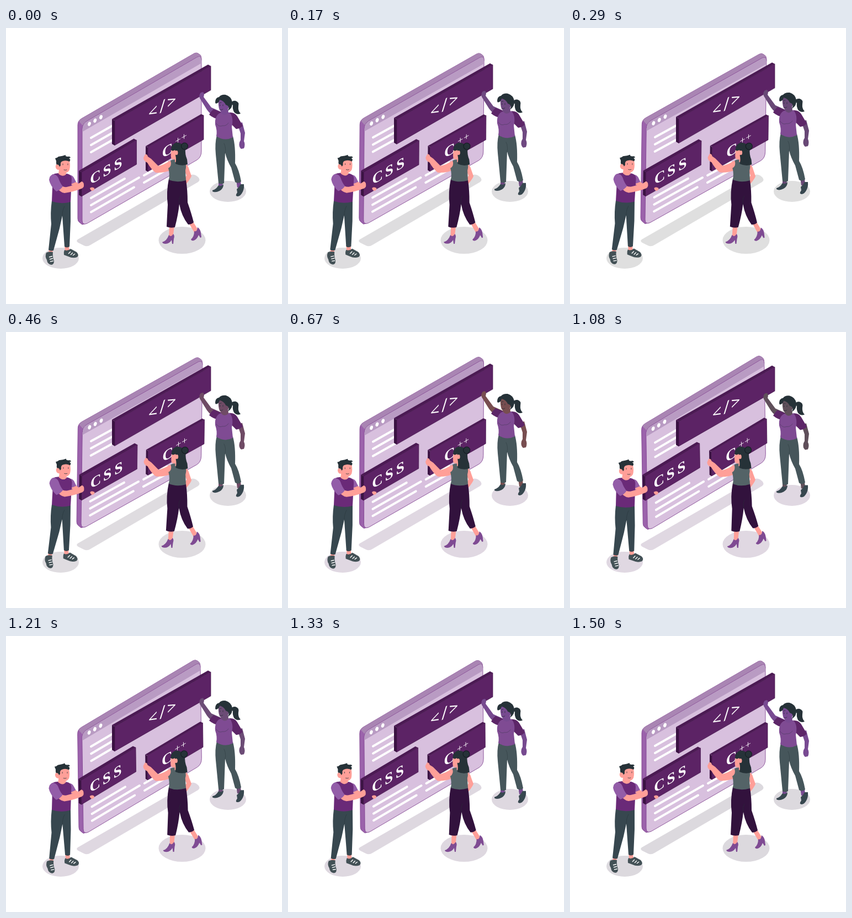
These frames come from a looping animation (500x500 px, 1540 ms). An HTML page:

```html
<!DOCTYPE html>
<html lang="en">
<head>
<meta charset="utf-8">
<title>Building a page</title>
<style>
  html, body { margin: 0; height: 100%; overflow: hidden; background: #fff; }
  svg { display: block; width: 100vw; height: 100vh; --skin: #784a92; --shade: #dcd9de; }
  .shade { fill: var(--shade); }
  .brown { fill: var(--skin); }
  .pink { fill: #ff9f98; }
  .hair { fill: #263238; }
  .slate { fill: #37474f; }
  .shoe { fill: #435156; }
  .grey { fill: #546367; }
  .plum { fill: #6a2a78; }
  .lilac { fill: #935da8; }
  .violet { fill: #7f4b93; }
  .night { fill: #32123d; }
  .face { fill: #5c2365; stroke: #431549; stroke-width: .7; }
  .side { fill: #3a1242; }
  .edge { fill: #4b1a53; }
  .line { fill: none; stroke: #fff; stroke-width: 4; stroke-linecap: round; }
  .crease { fill: none; stroke: #263238; stroke-width: .8; stroke-linecap: round; }
  .lace { fill: none; stroke: #fff; stroke-width: 1.4; }
  text { fill: #fff; text-anchor: middle; }
  .serif { font: bold 27px "Liberation Serif", serif; }
  .plus { font: 18px "Liberation Serif", serif; }
  .code { font: 29px "Noto Sans", sans-serif; }
</style>
</head>
<body>
<svg viewBox="0 0 500 500">
  <g class="shade">
    <path d="M130 383L332 267Q339 264 344 267L348 270Q353 275 348 279L153 393Q147 397 141 394L131 389Q126 386 130 383Z"/>
    <ellipse cx="99" cy="417" rx="33" ry="19"/>
    <ellipse cx="319" cy="384.500" rx="42.500" ry="24.500"/>
    <ellipse cx="402" cy="296" rx="33" ry="19"/>
  </g>

  <g id="page" stroke="#7a3a8a" stroke-width=".8">
    <path fill="#9b62ab" d="M130 176Q130 168 137 164L341 46Q345 44 348 46L352 49Q354 51 354 58L146 354L138 356L133 352Q130 350 130 345Z"/>
    <path fill="#a985b3" stroke="none" d="M132 169Q134 166 137 164L341 46Q345 44 348 46L352 49Q354 51 354 56L146 171L139 177Z"/>
    <path fill="#d8c0de" d="M138 184Q138 174 146 169L346 53Q354 49 354 58V223Q354 234 346 239L147 354Q138 358 138 348Z"/>
    <path fill="#b99bc3" stroke="none" d="M138.400 188V184Q138.400 174 146 169.500L346 53.500Q353.600 49.500 353.600 58V64Z"/>
    <g fill="#fff" stroke="none">
      <ellipse cx="151" cy="173.700" rx="2.700" ry="4" transform="rotate(20 151 173.700)"/>
      <ellipse cx="161.300" cy="167.700" rx="2.700" ry="4" transform="rotate(20 161.300 167.700)"/>
      <ellipse cx="172" cy="161.500" rx="2.700" ry="4" transform="rotate(20 172 161.500)"/>
    </g>
    <path class="line" d="M154 199l44-25M154 212l44-25M154 225l44-25M154 308l61-35M154 321l87-50M154 333.500l78-45M250 267l42-24M250 280l42-24"/>
  </g>

  <g id="lifter">
    <path class="edge" d="M192 165L366 66.300L371 69L197 168Z"/>
    <path class="side" d="M192 165l5 3v45l-5-3z"/>
    <path class="face" d="M197 168L371 69V112.500L197 212.500Z"/>
    <text class="code" transform="matrix(1 -.577 0 1 266 162)" x="0 17.500 34">&lt;/&gt;</text>

    <path class="brown" d="M385 278h8l-1 12h-7zM417 275h8l1 14h-7z"/>
    <path class="slate" d="M374 294Q380 293 385 285Q390 288 394 283Q394 291 387 295Q379 299 374 296ZM418 292Q422 289 425 283H431Q432 293 427 300Q422 307 417 304Q416 302 419 298Z"/>
    <path fill="#46565b" d="M382 194Q378 209 380 229L385 281Q390 284 395 281L397 226Q400 239 408 253L415 279Q421 283 426 278Q422 256 415 245Q416 213 411 196Z"/>
    <path class="crease" opacity=".5" d="M397 227Q399 216 395 209"/>
    <path class="brown" d="M386 161Q371 159 364 148L351 127Q349 121 353 117L357 116Q360 119 358 125L372 144L390 152Z"/>
    <path class="brown" d="M419 173L428 171L433 190L431 205Q434 211 431 218L426 219Q421 215 423 207L425 203L425 191Z"/>
    <path fill="#5d2668" d="M391 153L376 147Q371 151 368 157Q376 164 386 165ZM404 153Q414 152 419 160L429 177Q425 182 417 183L406 172Z"/>
    <path class="violet" d="M382 159Q385 154 391 153L405 153Q413 162 409 179L411 198Q396 206 381 196Q383 186 379 175Q378 165 382 159Z"/>
    <path class="crease" opacity=".45" d="M381 173Q386 180 392 177Q399 178 403 172"/>
    <path class="brown" d="M390 143L402 142L403 154Q396 161 389 153Z"/>
    <path class="hair" d="M408 136Q410 131 416 132Q423 134 421 142Q420 150 425 155Q418 158 413 152Q410 146 411 140Z"/>
    <path class="brown" d="M385 128Q384 142 387 149Q390 153 396 151Q404 147 406 138L403 127Z"/>
    <path class="hair" d="M379 135Q379 126 386 125Q390 120 398 121Q408 124 410 134Q411 145 402 150Q405 144 402 141L398 139Q395 132 387 130Q386 136 380 137Z"/>
    <path class="crease" d="M387 136l3-1M388 139v2M393 139v2M389 148q3 1 4-1"/>
  </g>

  <g id="styler">
    <path class="edge" d="M132 258.500L231.500 200.500L236.500 203L137 261.500Z"/>
    <path class="side" d="M132 258.500l5 3v44l-5-3z"/>
    <path class="face" d="M137 261L236.500 203V247L137 305Z"/>
    <text class="serif" transform="matrix(1 -.577 0 1 162 278.500)" x="0 21 41">CSS</text>

    <path class="pink" d="M152 290Q156 287 160 290Q161 293 157 295Q153 295 152 290Z"/>
    <path class="pink" d="M78 400h7l-1 10h-7zM106 394h8l1 10h-8z"/>
    <path class="shoe" d="M73 407Q79 404 85 406Q84 414 87 422Q87 429 82 429Q75 428 74 420Q70 414 73 407ZM106 402Q111 405 117 400L128 406Q133 411 129 415Q121 418 113 414L105 411Q104 406 106 402Z"/>
    <path class="lace" d="M78 415l6-1.500M79 419l6-1.500M80 423l6-1M113 409l4-4M117 411l4-4M121 412l4-3"/>
    <path class="slate" d="M83 313Q80 335 82 355L77 402Q81 405 86 403L97 363L102 340L106 396Q110 399 115 396L117 350V313Z"/>
    <path class="crease" opacity=".6" d="M102 340Q102 330 106 323"/>
    <path class="lilac" d="M114 266Q121 266 124 273L128 281L118 288Z"/>
    <path class="pink" d="M117 283L127 279L134 284L130 291Z"/>
    <path class="plum" d="M83 266Q89 263 95 263L111 264Q119 266 119 273L117 315Q100 320 83 314L84 290Z"/>
    <path class="pink" d="M96 257L109 258L109 265Q103 271 95 264Z"/>
    <path class="pink" d="M90 286L97 283Q103 289 110 288L130 283L137 278Q141 279 141 284Q142 290 134 292Q121 297 106 299Q97 298 90 286Z"/>
    <path class="lilac" d="M85 265Q79 267 78 275Q80 286 91 296Q98 294 103 287Q98 281 95 272Q92 265 85 265Z"/>
    <path class="pink" d="M94 240Q103 236 115 240Q117 250 115 257Q112 263 104 263Q97 261 95 256Z"/>
    <path class="hair" d="M95 254Q90 248 91 241L89 236Q92 236 95 233Q103 232 108 230Q107 233 112 233Q116 232 117 235L114 236Q118 238 115 242Q109 239 103 241Q98 242 99 249Z"/>
    <ellipse class="pink" cx="93.500" cy="252" rx="3.500" ry="5" transform="rotate(-20 93.500 252)"/>
    <path class="crease" d="M103 246v2M112 246v2M105 257q3 1 5 0"/>
  </g>

  <g id="coder">
    <path class="edge" d="M253 214L353.500 156L358 158L257 216Z"/>
    <path class="side" d="M253 214l4 2.500v44l-4-2.500z"/>
    <path class="face" d="M257 216L358 158V202L257 260Z"/>
    <text class="serif" transform="matrix(1 -.577 0 1 292.500 230.500)">C</text>
    <text class="plus" transform="matrix(1 -.577 0 1 311.500 209)" x="0 11">++</text>

    <path class="pink" d="M296 358h9l-2 17-8 5zM331 353l8-2 8 13-5 8z"/>
    <path class="violet" d="M283 388Q291 386 295 375Q299 380 303 373Q306 376 304 382L303 391L301 391L300 384Q296 391 289 391Q284 391 283 388ZM335 383Q341 378 341 368Q346 370 347 361Q352 364 353 371L354 379L352 380L349 375Q346 383 340 385Q336 386 335 383Z"/>
    <path class="pink" d="M324 246Q330 248 332 257L336 268Q335 272 327 282L322 276L327 267L322 256Z"/>
    <path class="night" d="M295 273Q290 298 293 320L291 360Q298 363 306 361Q312 338 314 319Q318 341 330 356Q336 356 340 352Q336 336 329 316Q329 294 326 275Z"/>
    <path class="crease" opacity=".6" d="M314 319Q312 311 316 304"/>
    <path class="pink" d="M304 241Q308 249 300 257Q287 263 271 262Q263 256 256 244Q249 241 249 235L252 229Q256 228 257 233L263 237L276 250Q286 248 296 241Z"/>
    <path class="grey" d="M298 240Q302 238 307 238L323 241Q328 248 325 258L326 276Q309 281 295 275Q297 264 294 254Q301 250 298 240Z"/>
    <path class="pink" d="M300 219Q298 228 299 235Q301 239 306 238L306 243L315 242V219Z"/>
    <path class="hair" d="M299 221Q299 210 309 207.500Q321 208 325 218Q324 229 328 238L329 247Q318 251 307 246Q309 237 307 231Q310 225 306 221Q302 224 299 221Z"/>
    <circle class="hair" cx="323.500" cy="214" r="6" stroke="#131b20"/>
    <ellipse class="pink" cx="309" cy="226" rx="2.500" ry="4"/>
  </g>
</svg>

<script>
  const LOOP = 1540, CYCLE = 1500;
  const svg = document.querySelector("svg");
  const pivots = { page: [242, 200], styler: [152, 315], coder: [306, 274] };

  // time, skin rgb, floor shadow rgb
  const tints = [
    [0, 120, 74, 146, 220, 217, 222],
    [290, 104, 72, 118, 223, 223, 223],
    [670, 120, 78, 80, 224, 216, 226],
    [920, 112, 76, 88, 224, 217, 227],
    [1080, 95, 79, 90, 224, 216, 226],
    [1330, 119, 74, 144, 222, 216, 224],
    [1500, 120, 74, 146, 220, 217, 222]
  ];

  function tintAt(time) {
    const next = Math.max(1, tints.findIndex(tint => tint[0] >= time));
    const a = tints[next - 1], b = tints[next];
    const k = (time - a[0]) / (b[0] - a[0]);
    return a.map((v, i) => Math.round(v + (b[i] - v) * k));
  }

  // Linear wave: 0, 1, 0, -1, 0
  const sway = p => p < .25 ? 4 * p : p < .75 ? 2 - 4 * p : 4 * p - 4;
  const lift = p => 10 * (1 - Math.abs(1 - 2 * p));

  function move(id, value) {
    document.getElementById(id).setAttribute("transform", value);
  }

  function draw() {
    const time = Math.min(performance.now() % LOOP, CYCLE);
    const p = time / CYCLE;
    for (const id in pivots) move(id, `rotate(${sway(p)} ${pivots[id].join(" ")})`);
    move("lifter", `translate(0 ${-lift(p)})`);
    const tint = tintAt(time);
    svg.style.setProperty("--skin", `rgb(${tint.slice(1, 4)})`);
    svg.style.setProperty("--shade", `rgb(${tint.slice(4)})`);
    requestAnimationFrame(draw);
  }
  draw();
</script>
</body>
</html>
```
